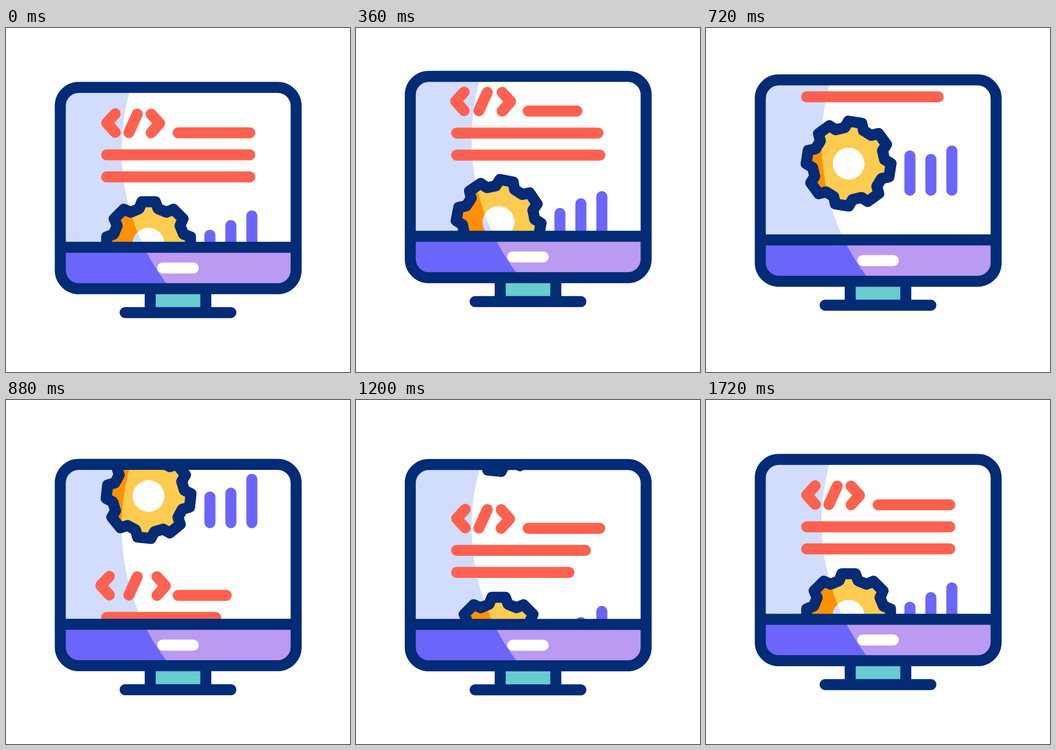
Animation, 640 px wide and 640 px high, one loop 1960 ms. Source, as an HTML page with a canvas:

```html
<!DOCTYPE html>
<html lang="en">
<head>
<meta charset="utf-8">
<title>Code monitor</title>
<style>
  html, body { margin: 0; width: 100%; height: 100%; overflow: hidden; background: #fff; }
  canvas { display: block; width: 100vw; height: 100vh; object-fit: contain; }
</style>
</head>
<body>
<canvas id="stage"></canvas>
<script>
const SIZE = 640, LOOP = 1960, STEP = 40, STROKE = 20.5, PAGE = 391;
const NAVY = '#032b76', PALE = '#d2dcfd', VIOLET = '#6b66f9', LILAC = '#bb9af2',
      TEAL = '#67cbd0', RED = '#ff6150', YELLOW = '#fdcb50', ORANGE = '#ff9100';

const canvas = document.getElementById('stage');
const ctx = canvas.getContext('2d');
const ratio = window.devicePixelRatio || 1;
canvas.width = canvas.height = SIZE * ratio;

// Cubic bezier (.6, 0, .4, 1), solved by bisection
function ease(x) {
  if (x <= 0) return 0;
  if (x >= 1) return 1;
  let lo = 0, hi = 1, u = 0.5;
  for (let i = 0; i < 24; i++) {
    u = (lo + hi) / 2;
    const v = 1 - u;
    if (1.8 * u * v * v + 1.2 * u * u * v + u * u * u < x) lo = u; else hi = u;
  }
  return u * u * (3 - 2 * u);
}

const ramp = (t, from, to) => ease((t - from) / (to - from));
const pulse = (t, from, peak, to) => ramp(t, from, peak) - ramp(t, peak, to);

function line(color, ...points) {
  ctx.beginPath();
  for (let i = 0; i < points.length; i += 2) ctx.lineTo(points[i], points[i + 1]);
  ctx.strokeStyle = color;
  ctx.stroke();
}

function fillRect(color, x, y, w, h) {
  ctx.fillStyle = color;
  ctx.fillRect(x, y, w, h);
}

function fillPath(color, path, rule) {
  ctx.fillStyle = color;
  ctx.fill(path, rule);
}

function scoped(draw) {
  ctx.save();
  draw();
  ctx.restore();
}

const glare = new Path2D();
glare.arc(625.6, 227.3, 410.6, 0, 7);

const body = new Path2D();
body.roundRect(101, 110.4, 438.8, 374.6, 34.5);

const rim = new Path2D();
for (let k = 0; k < 8; k++) {
  const c = Math.cos(k * Math.PI / 4), s = Math.sin(k * Math.PI / 4);
  for (const [x, y] of [[-17.7, -65], [-12.6, -78], [12.6, -78], [17.7, -65]])
    rim.lineTo(x * c - y * s, x * s + y * c);
}
rim.closePath();

const cog = new Path2D(rim);
cog.moveTo(29.8, 0);
cog.arc(0, 0, 29.8, 0, 7);

function gear(y, degrees) {
  const place = () => {
    ctx.translate(265.3, y);
    ctx.rotate(degrees * Math.PI / 180);
  };
  scoped(() => { place(); fillPath(ORANGE, cog, 'evenodd'); });
  scoped(() => { ctx.clip(glare); place(); fillPath(YELLOW, cog, 'evenodd'); });
  scoped(() => { place(); ctx.strokeStyle = NAVY; ctx.stroke(rim); });
}

function code(y, spread, cuts) {
  const l = 187.4 - spread, r = 285.6 + spread;
  line(RED, l + 15.8, y + 159.6, l, y + 176.8, l + 15.8, y + 194.2);
  line(RED, 244.2, y + 160.2, 228.6, y + 194.4);
  line(RED, r - 15.6, y + 160.2, r, y + 177.4, r - 15.6, y + 195);
  [320.4, 187.2, 187.2].forEach((x, i) =>
    line(RED, x, y + 195 + 41 * i, 453.6 - cuts[i], y + 195 + 41 * i));
}

function bars(y, t) {
  const peaks = [1100, 845, 682];
  peaks.forEach((peak, i) => {
    const x = 379.4 + 39 * i;
    const cut = 28.5 * pulse(t, peak - 485, peak, peak + 490);
    line(VIOLET, x, y + 385.4 - 18 * i + cut, x, y + 450.8);
  });
}

function screen(t) {
  ctx.clip(body);
  fillRect(PALE, 91, 100, 460, 308);
  fillPath('#fff', glare);

  scoped(() => {
    ctx.beginPath();
    ctx.rect(91, 100, 460, 308);
    ctx.clip();
    const top = -PAGE * ramp(t, 39, 1603);
    const spread = 11 * pulse(t, 100, 850, 1230);
    const cuts = (starts, out) => starts.map((s, i) => {
      const p = ramp(t, s, s + 725);
      return (i ? 64 : 96) * (out ? p : 1 - p);
    });
    code(top, spread, cuts([14, 207, 407], true));
    code(top + PAGE, spread, cuts([505, 814, 1000], false));
    gear(top + 401.2, 360 * ramp(t, 112, 1628));
    gear(top + PAGE + 401.2, 0);
    bars(top, t);
    bars(top + PAGE, t);
  });

  scoped(() => {
    ctx.beginPath();
    ctx.rect(91, 408, 460, 90);
    ctx.clip();
    fillRect(VIOLET, 91, 408, 460, 90);
    fillPath(LILAC, glare);
  });
  line('#fff', 291.6, 446.6, 348.4, 446.6);
}

function render(t) {
  ctx.setTransform(ratio, 0, 0, ratio, 0, 0);
  fillRect('#fff', 0, 0, SIZE, SIZE);
  ctx.lineWidth = STROKE;
  ctx.lineCap = ctx.lineJoin = 'round';

  ctx.translate(0, -25 * ramp(t, 36, 529) + 37 * ramp(t, 529, 990) - 12 * ramp(t, 990, 1580));
  fillRect(TEAL, 268, 485, 104, 44);
  line(NAVY, 268.3, 490, 268.3, 529);
  line(NAVY, 371.7, 490, 371.7, 529);
  line(NAVY, 221.6, 529.6, 418.4, 529.6);
  scoped(() => screen(t));
  line(NAVY, 101, 408, 539.8, 408);
  ctx.stroke(body);
}

const start = performance.now();
function tick(now) {
  const t = Math.max(0, now - start) % LOOP;
  render(Math.floor(t / STEP) * STEP);
  requestAnimationFrame(tick);
}
render(0);
requestAnimationFrame(tick);
</script>
</body>
</html>
```
